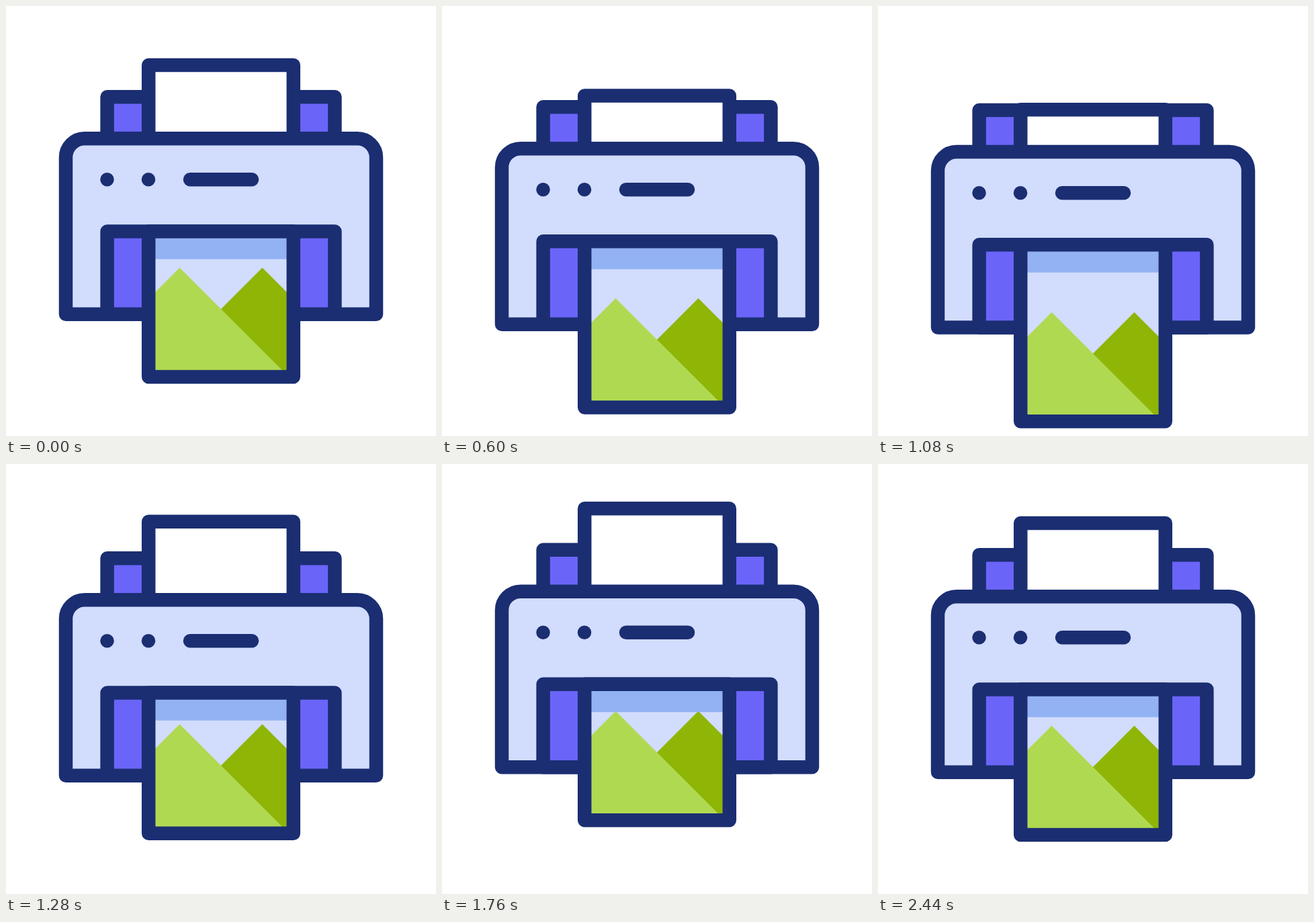
Recreate the animation shown at these times as an HTML page with a canvas. Size 640 by 640 pixels, loop 2.64 s.

```html
<!DOCTYPE html>
<html lang="en">
<head>
<meta charset="utf-8">
<title>Printer</title>
<style>
  html, body { margin: 0; height: 100%; overflow: hidden; background: #fff; }
  canvas { display: block; width: 100vmin; height: 100vmin; }
</style>
</head>
<body>
<canvas width="640" height="640"></canvas>
<script>
const ctx = document.querySelector('canvas').getContext('2d');
const NAVY = '#1b2e72', PALE = '#d2dcfd', PURPLE = '#6b64f9';
const SHADE = '#93b2f4', LIME = '#b0d952', GREEN = '#8fb507';
const LOOP = 2640, STEP = 40;

// Keys: [time, offset, ease strength of the move that ends here]
const paperKeys = [[200, 0], [885, 67, .55], [1052, 67, .5], [1500, -66.5, .5], [1995, 14.6, .5], [2440, 0, .45]];
const bodyKeys = [[200, 0], [880, 20, .7], [1052, 20, .5], [1500, -9, .5], [2360, 0, .5]];

// Symmetric cubic-bezier(a, 0, 1 - a, 1)
function ease(x, a) {
  let lo = 0, hi = 1;
  for (let i = 0; i < 24; i++) {
    const s = (lo + hi) / 2, r = 1 - s;
    if (3 * a * s * r * r + 3 * (1 - a) * s * s * r + s ** 3 < x) lo = s;
    else hi = s;
  }
  return lo * lo * (3 - 2 * lo);
}

function offset(keys, t) {
  if (t <= keys[0][0]) return keys[0][1];
  for (let i = 1; i < keys.length; i++) {
    const [t0, v0] = keys[i - 1], [t1, v1, a] = keys[i];
    if (t < t1) return v0 + (v1 - v0) * ease((t - t0) / (t1 - t0), a);
  }
  return keys.at(-1)[1];
}

function box(x0, y0, x1, y1, fill, radius = 0) {
  ctx.beginPath();
  ctx.roundRect(x0, y0, x1 - x0, y1 - y0, radius);
  ctx.fillStyle = fill;
  ctx.fill();
  ctx.stroke();
}

function line(x0, x1, y) {
  ctx.beginPath();
  ctx.moveTo(x0, y);
  ctx.lineTo(x1, y);
  ctx.stroke();
}

function mountain(x, y, bottom, fill) {
  const h = bottom - y;
  ctx.beginPath();
  ctx.moveTo(x, y);
  ctx.lineTo(x + h, bottom);
  ctx.lineTo(x - h, bottom);
  ctx.fillStyle = fill;
  ctx.fill();
}

function draw(t) {
  const paper = offset(paperKeys, t), body = offset(bodyKeys, t);
  const slot = 335.4 + body, bottom = 552 + paper;
  ctx.clearRect(0, 0, 640, 640);
  ctx.strokeStyle = NAVY;
  ctx.lineWidth = 20.5;
  ctx.lineCap = ctx.lineJoin = 'round';

  box(150.6, 135.2 + body, 489.4, 250 + body, PURPLE);
  box(212.2, 88 + paper, 427.8, 270 + body, '#fff');

  box(89, 197.2 + body, 551, 458.7 + body, PALE, [28, 28, 0, 0]);
  for (const x of [150.5, 212]) line(x, x + .01, 258.3 + body);
  line(274, 366, 258.3 + body);
  box(150.6, slot, 489.4, 458.7 + body, PURPLE);

  // Printed sheet
  ctx.save();
  ctx.beginPath();
  ctx.rect(212.2, slot, 215.6, bottom - slot);
  ctx.clip();
  ctx.fillStyle = PALE;
  ctx.fill();
  mountain(381.5, 389.5 + paper, bottom, GREEN);
  mountain(258.5, 389.5 + paper, bottom, LIME);
  ctx.fillStyle = SHADE;
  ctx.fillRect(212.2, slot, 215.6, 41.4);
  ctx.restore();
  box(212.2, slot, 427.8, bottom, 'transparent');
}

const start = performance.now();
function tick() {
  const t = (performance.now() - start) % LOOP;
  draw(Math.floor(t / STEP) * STEP);
  requestAnimationFrame(tick);
}
tick();
</script>
</body>
</html>
```
